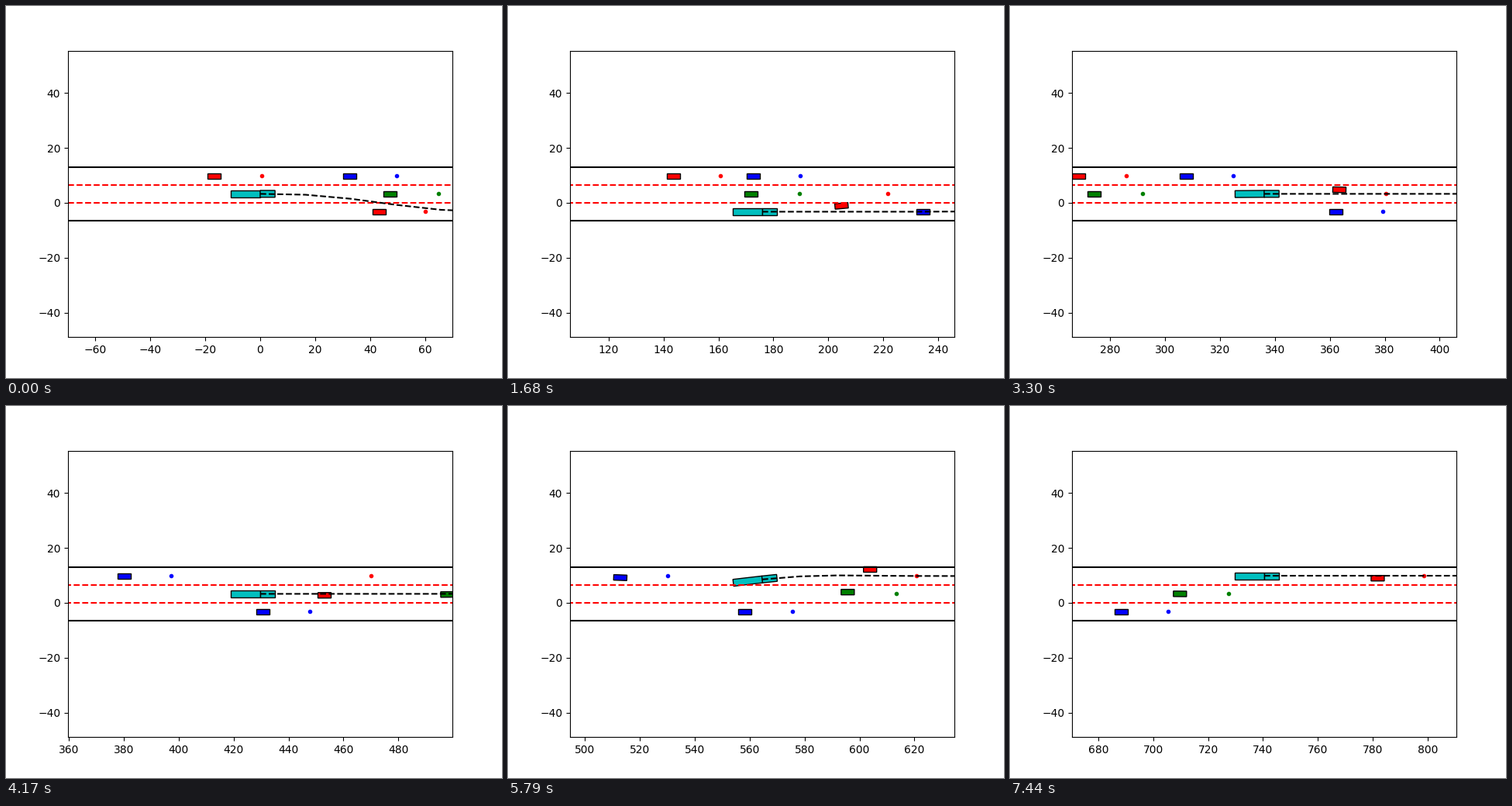
Animation, 640 px wide and 480 px high, one loop 7470 ms. Source, as a matplotlib script:

```python
import numpy as np
import matplotlib.pyplot as plt
from matplotlib.animation import FuncAnimation
from matplotlib.patches import Polygon

FRAMES, INTERVAL = 249, 30
LANE = 6.5
LOW, MID, TOP = -LANE / 2, LANE / 2, 1.5 * LANE
VIEW = 70
frame = np.arange(FRAMES)


def bell(center, width):
    return np.exp(-0.5 * ((frame - center) / width) ** 2)


def cruise(start, speed, *slowdowns):
    """Distance at a steady speed, less soft slowdowns (center, width, depth)."""
    v = speed - sum(depth * bell(c, w) for c, w, depth in slowdowns) + 0 * frame
    return start + np.cumsum(v) - (v + v[0]) / 2


def swing(since):
    """Damped steering response, 0 to 1, overshooting the new lane."""
    t = np.maximum(frame - since, 0)
    damp, rate = 0.02, 0.058
    return 1 - np.exp(-damp * t) * (np.cos(rate * t) + damp / rate * np.sin(rate * t))


def ease(x, start, length):
    u = np.clip((x - start) / length, 0, 1)
    return u ** 3 * (10 - 15 * u + 6 * u * u)


def route(x):
    """Lateral position of the truck along the road."""
    return (MID - LANE * ease(x, 0, 88) + LANE * ease(x, 237, 100)
            + 6.8 * ease(x, 499, 100) - 0.3 * ease(x, 575, 55))


def box(x, y, back, front, width, angle):
    c, s = np.cos(angle), np.sin(angle)
    w = width / 2
    pts = np.array([(back, -w), (front, -w), (front, w), (back, w)])
    return pts @ np.array([(c, s), (-s, c)]) + (x, y)


fig, ax = plt.subplots(figsize=(6.4, 4.8), dpi=100)
half = VIEW * 369.6 / 496
ax.set_ylim(MID - half, MID + half)

for y, style in ((-LANE, "k-"), (0, "r--"), (LANE, "r--"), (2 * LANE, "k-")):
    ax.plot([-VIEW, 2000], [y, y], style)


def body(color):
    return ax.add_patch(Polygon(np.zeros((4, 2)), facecolor=color, edgecolor="k"))


class Car:
    def __init__(self, color, x, goal, drift=0, ahead=17.2):
        self.x, self.ahead = x, ahead
        self.goal = goal + 0 * frame
        self.y = self.goal + drift
        self.angle = np.arctan2(np.gradient(self.y), np.gradient(x))
        self.patch = body(color)
        self.dot, = ax.plot([], [], color + ".")

    def draw(self, i):
        x = self.x[i]
        self.patch.set_xy(box(x, self.y[i], -2.4, 2.4, 2, self.angle[i]))
        self.dot.set_data([x + self.ahead], [self.goal[i]])


ego = cruise(0, 3.3, (66.2, 22.15, 0.497), (171.85, 17.35, 1.159))
speed = np.gradient(ego)
trailer, cab = body("c"), body("c")

# The fast red car changes lane twice.
turns = (41, 137)
lead_goal = LOW + LANE * sum(frame >= t for t in turns)
lead_y = LOW + LANE * sum(swing(t) for t in turns)

cars = [
    Car("r", cruise(-16.7, 2.878, (115, 26, 1.135)), TOP),
    Car("b", cruise(32.6, 2.5, (212, 20, 0.26)), TOP, -2.6 * bell(212, 11)),
    Car("g", cruise(47.3, 2.243, (100, 25, 0.487)), MID, ahead=17.7),
    Car("g", cruise(204.1, 2.145, (165, 27, 0.389)), MID,
        0.65 * np.sin(np.pi * (frame - 150) / 98), 17.7),
    Car("b", cruise(102.2, 2.363), LOW),
    Car("r", cruise(43.4, 3.24, (52.7, 24.5, 0.606), (156, 15.8, 0.72)),
        lead_goal, lead_y - lead_goal, 16.8),
]

plan, = ax.plot([], [], "k--")


def draw(i):
    x = ego[i]
    y = route(x)
    ax.set_xlim(x - VIEW, x + VIEW)
    cab.set_xy(box(x, y, 0, 5.4, 2.5, np.arctan(route(x + 0.5) - route(x - 0.5))))
    trailer.set_xy(box(x, y, -10.6, 0.1, 2.5, np.arctan((y - route(x - 10.6)) / 10.6)))
    for car in cars:
        car.draw(i)
    px = x + 5 * speed[i] * np.arange(10)
    plan.set_data(px, route(px))
    return []


anim = FuncAnimation(fig, draw, frames=FRAMES, interval=INTERVAL,
                     init_func=lambda: draw(0), repeat=True, repeat_delay=0)
plt.show()
```
